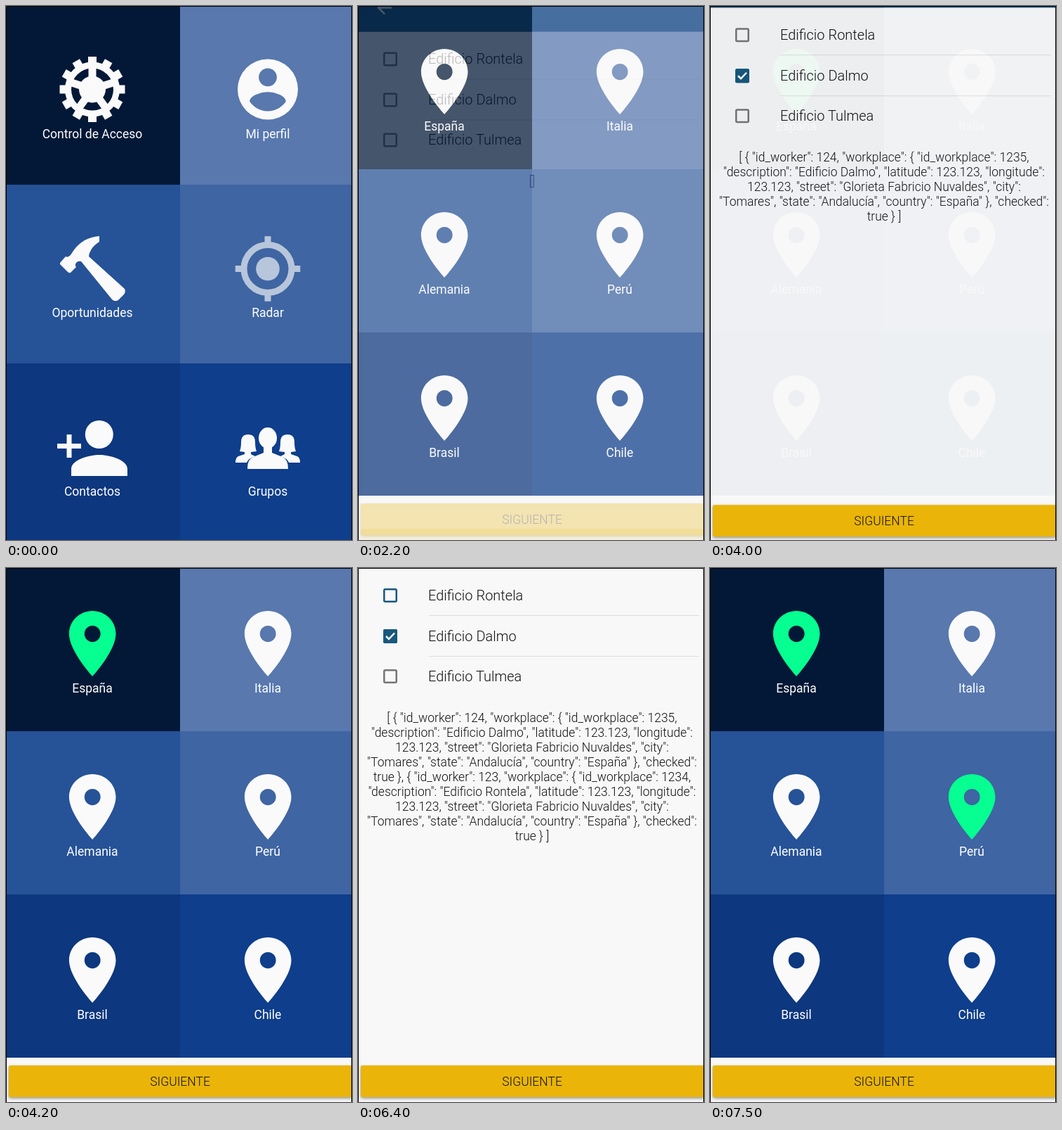
An HTML page for the animation above (8 s loop, 493x759 px).

```html
<!DOCTYPE html>
<html lang="es">
<head>
<meta charset="utf-8">
<style>
  html, body { margin: 0; width: 100%; height: 100%; overflow: hidden; background: #f8f8f8; }
  svg { display: block; font: 17.5px Roboto, sans-serif; }
  .white { fill: #fafafa; stroke: none; }
  .label { fill: #fff; text-anchor: middle; }
  .light { font-weight: 300; fill: #111; white-space: pre; }
  .mid { text-anchor: middle; }
  .button rect { fill: #eab508; filter: drop-shadow(0 2px 2px #0006); }
</style>
</head>
<body>
<svg id="stage" width="493" height="759" viewBox="0 0 493 759"></svg>
<script>
const TILE_COLORS = ['#031836', '#5878ae', '#265297', '#3f65a2', '#0d377e', '#0e3e8c'];
const COUNTRIES = ['España', 'Italia', 'Alemania', 'Perú', 'Brasil', 'Chile'];
const SECTIONS = ['Control de Acceso', 'Mi perfil', 'Oportunidades', 'Radar', 'Contactos', 'Grupos'];
const BUILDINGS = ['Edificio Rontela', 'Edificio Dalmo', 'Edificio Tulmea'];
const BLUE = '#17587e', GREEN = '#06ff90', WHITE = '#fafafa', GREY = '#757575';
const ROW = 57.5;
const range = n => [...Array(n).keys()];

const tiles = (names, step, baseline) => names.map((name, i) => {
  const right = i % 2, row = i >> 1, top = Math.round(row * step);
  return `<rect x="${right ? 248 : 1}" y="${row ? top : 1}" width="${right ? 244 : 247}"
      height="${Math.round((row + 1) * step) - (row ? top : 1)}" fill="${TILE_COLORS[i]}"/>
    <text class="label" x="${right ? 373 : 123}" y="${baseline + row * step}">${name}</text>`;
}).join('');

const page = (id, content) => `<g id="${id}">
  <rect width="493" height="830" fill="#f8f8f8"/>
  <rect y="-70" width="493" height="70" fill="${BLUE}"/>
  <path d="M48-34H29m9-9-9 9 9 9" fill="none" stroke="#fff" stroke-width="2.5"/>
  ${content}</g>`;

const button = id => `<g class="button" id="${id}">
  <rect x="4" y="707" width="489" height="45" rx="2"/>
  <text class="light mid" x="248" y="736">SIGUIENTE</text></g>`;

// Icons of the first screen
const spokes = (count, from, to, width) => range(count).map(i =>
  `<path d="M0 ${-from}V${-to}" stroke-width="${width}" transform="rotate(${i * 360 / count})"/>`).join('');
const gear = `<g transform="translate(123 118.5)" stroke="${WHITE}" fill="none">
  <circle r="34.5" stroke-width="9"/><circle r="19" class="white"/>
  ${spokes(12, 36, 46.5, 12)}${spokes(5, 0, 32, 11)}</g>`;
const profile = `<path class="white" fill-rule="evenodd" transform="translate(373 118.5) scale(4.3) translate(-12 -12)"
  d="M12 2a10 10 0 1 0 0 20 10 10 0 0 0 0-20zm0 3a3 3 0 1 1 0 6 3 3 0 0 1 0-6zm0 14.2c-2.5 0-4.7-1.3-6-3.2 0-2 4-3.1 6-3.1s6 1.1 6 3.1c-1.3 1.9-3.5 3.2-6 3.2z"/>`;
const hammer = `<path class="white" d="M77 365 85 356Q88 358 92 354 100 340 112 333 122 328 133 327V335Q124 341 121 347 118 352 118 356L169 402Q171 406 168 410L160 418Q155 421 151 417L107 363Q101 362 99 367 98 369 100 371L92 379Q90 380 88 378L77 367Z"/>`;
const radar = `<g id="radar" transform="translate(373 373.5)" stroke="${WHITE}" fill="none">
  <circle r="16.8" class="white"/><circle r="34" stroke-width="9"/>${spokes(4, 37, 46.3, 9)}</g>`;
const contact = `<g class="white"><circle cx="132.8" cy="609" r="20"/>
  <path d="M133 638c-13.2 0-40 6.7-40 20v10h80v-10c0-13.3-26.8-20-40-20zM73 622h13.500v-13h7v13h13.500v7h-13.500v13h-7v-13h-13.500z"/></g>`;
const sidePerson = `<path d="M333 633Q335 628 335 620 335 609 345 609 355 609 355 620 355 628 357 633L349 634V637L355 640Q345 643 343 649H327Q327 642 331 640L340 637V634Z"/>`;
const group = `<g class="white">${sidePerson}<g transform="matrix(-1 0 0 1 746 0)">${sidePerson}</g>
  <ellipse cx="373" cy="614" rx="13" ry="15"/>
  <path d="M344 658Q344 644 352 641L367 635V624H379V635L394 641Q402 644 402 658Z"/></g>`;

const pin = i => `<path id="pin${i}" fill="${WHITE}" fill-rule="evenodd"
  transform="translate(${i % 2 ? 373.2 : 123.2} ${61 + (i >> 1) * 232}) scale(4.76 4.65) translate(-12 -2)"
  d="M12 2C8.130 2 5 5.130 5 9c0 5.250 7 13 7 13s7-7.750 7-13c0-3.870-3.130-7-7-7zm0 4.500a2.400 2.500 0 1 1 0 5 2.400 2.500 0 0 1 0-5z"/>`;

const checkRow = (name, i) => {
  const y = Math.round(29 + ROW * i), top = Math.round(10 + ROW * i);
  return `<clipPath id="row${i}"><rect x="11" y="${top}" width="471" height="58"/></clipPath>
    <text class="light" font-size="20" x="100" y="${Math.round(46 + ROW * i)}">${name}</text>
    ${i < 2 ? `<rect x="101" y="${top + 57}" width="385" height="1" fill="#dcdcdc"/>` : ''}
    <g transform="translate(36 ${y})" fill="none">
      <rect id="box${i}" x="1.25" y="1.25" width="17.5" height="17.5" rx="1.5" stroke-width="2.5"/>
      <g id="mark${i}"><rect width="20" height="20" rx="2" fill="${BLUE}"/>
        <path d="M4 10 8 14 16 5.500" stroke="#fff" stroke-width="2.5"/></g></g>
    <g clip-path="url(#row${i})"><circle id="ripple${i}" cx="93" cy="${y + 10}"/></g>`;
};

// The printed selection, broken into centred lines
const worker = (id, place, name) => [
  `{ "id_worker": ${id}, "workplace": { "id_workplace": ${place},`,
  `"description": "${name}", "latitude": 123.123, "longitude":`,
  '123.123, "street": "Glorieta Fabricio Nuvaldes", "city":',
  '"Tomares", "state": "Andalucía", "country": "España" }, "checked":',
  'true }'];
const first = worker(124, 1235, BUILDINGS[1]), second = worker(123, 1234, BUILDINGS[0]);
const dump = lines => lines.map((line, i) =>
  `<text class="light mid" x="248" y="${219 + 21 * i}">${line}</text>`).join('');
const one = `[ ${first.join('\n')} ]`.split('\n');
const two = `[ ${first.join('\n')}, ${second.join('\n')} ]`.split('\n');
const dumps = [['[]'], one, two].map((lines, i) => `<g id="dump${i}">${dump(lines)}</g>`).join('');

document.getElementById('stage').innerHTML =
  tiles(SECTIONS, 254, 188) + gear + profile + hammer + radar + contact + group +
  page('grid', tiles(COUNTRIES, 232, 177) + range(6).map(pin).join('') + button('gridButton')) +
  page('list', BUILDINGS.map(checkRow).join('') + dumps + button('listButton')) +
  '<path d="M.5 760V.5H492.500V760" fill="none" stroke="#000"/>';

const set = (id, attrs) => {
  const node = document.getElementById(id);
  for (const name in attrs) node.setAttribute(name, attrs[name]);
};
const clamp = v => Math.min(1, Math.max(0, v));

const bezier = (x1, y1, x2, y2) => x => {
  const at = (a, b, s) => 3 * (1 - s) ** 2 * s * a + 3 * (1 - s) * s * s * b + s ** 3;
  let lo = 0, hi = 1;
  for (let i = 0; i < 24; i++) {
    const s = (lo + hi) / 2;
    if (at(x1, x2, s) < x) lo = s; else hi = s;
  }
  return at(y1, y2, hi);
};
const easeEnter = bezier(.36, .66, .04, 1), easeLeave = bezier(.47, 0, .745, .715);
const enter = (t, start, duration = 280) => easeEnter(clamp((t - start) / duration));
const leave = (t, start) => 1 - easeLeave(clamp((t - start) / 200));

const showPage = (id, shown) => set(id, {
  display: shown < .001 ? 'none' : 'inline',
  opacity: shown,
  transform: `translate(0 ${50 * (1 - shown)})`
});

const showCheck = (i, age) => {
  set('box' + i, { stroke: age >= 0 ? BLUE : GREY });
  set('mark' + i, { opacity: clamp(age / 90) });
  set('ripple' + i, { r: Math.max(0, age * .73), opacity: age < 0 ? 0 : .13 * clamp(1.3 - age / 200) });
};

function draw(now) {
  const t = Math.floor(now % 8000 / 100) * 100;
  const again = t >= 5000;

  set('radar', { opacity: t < 600 ? .65 + .35 * clamp((t - 200) / 200) : 1 - .35 * clamp((t - 500) / 400) });

  showPage('grid', enter(t, 1060, 600));
  showPage('list', t < 3900 ? enter(t, 2166) : !again ? leave(t, 3960) :
    t < 7200 ? enter(t, 5030) : leave(t, 7260));

  set('pin0', { fill: t >= 3000 ? GREEN : WHITE });
  set('pin3', { fill: t >= 6000 ? GREEN : WHITE });
  set('gridButton', { opacity: t >= 3000 ? 1 : .4 });

  const ages = [t - 6400, t - (again ? 5940 : 2940), -1];
  ages.forEach((age, i) => showCheck(i, age));
  const count = ages.filter(age => age >= 0).length;
  range(3).forEach(i => set('dump' + i, { display: i === count ? 'inline' : 'none' }));
  set('listButton', { opacity: count ? 1 : .4 });

  requestAnimationFrame(loop);
}
const began = performance.now();
function loop() { draw(performance.now() - began); }
loop();
</script>
</body>
</html>
```
